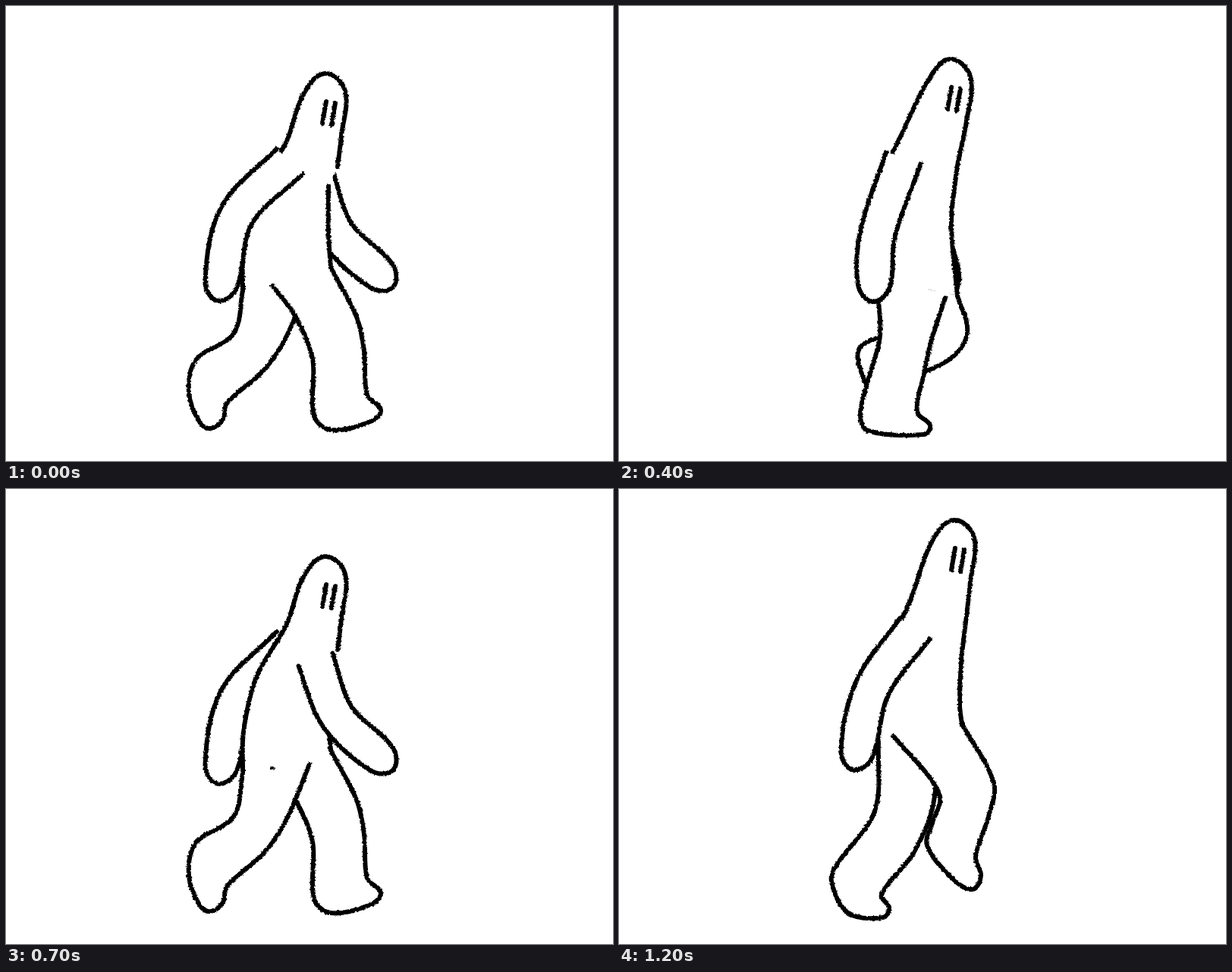
An HTML page for the animation above (1.3 s loop, 800 by 600 pixels).

```html
<!DOCTYPE html>
<html lang="en">
<head>
<meta charset="utf-8">
<title>Walk cycle</title>
<style>
  html, body { margin: 0; width: 100%; height: 100%; overflow: hidden; background: #fff; }
  svg { display: block; width: 800px; height: 600px; }
  path { fill: #fff; stroke: #000; stroke-width: 6; stroke-linecap: round; stroke-linejoin: round; }
  .line { fill: none; }
  .fill { stroke: none; }
</style>
</head>
<body>
<svg viewBox="0 0 800 600">
  <filter id="rough" filterUnits="userSpaceOnUse" x="0" y="0" width="800" height="600" color-interpolation-filters="sRGB">
    <feTurbulence id="grain" type="fractalNoise" baseFrequency=".35" numOctaves="2"/>
    <feDisplacementMap in="SourceGraphic" scale="3.5" xChannelSelector="R" yChannelSelector="G"/>
  </filter>
  <g id="figure" filter="url(#rough)"></g>
</svg>
<script>
// Half a stride. The other half is the same with the limbs swapped.
// body: back, shoulder, nape, crown, neck, chest, belly
// leg:  front hip, knee, shin, ankle, toe, ball, sole, heel, calf, hollow of the knee, back hip
// arm:  shoulder, elbow, hand
const pose = (at, body, legA, legB, armA, armB) => ({
  at,
  parts: [body, legA, legB, armA, armB].map(s => s.split(' ').map(p => p.split(',').map(Number)))
});
const half = [
  pose(0,
    '313,320 330,248 370,178 420,89 437,212 425,238 425,300',
    '428,345 462,410 472,455 476,513 494,533 478,549 428,559 406,540 404,465 380,407 351,369',
    '400,363 369,437 340,480 291,524 286,545 270,557 256,550 241,510 250,467 300,432 312,375',
    '374,205 304,276 283,368', '408,225 436,299 495,356'),
  pose(2,
    '315,345 338,278 368,207 418,120 434,244 431,282 428,330',
    '425,369 470,406 479,437 482,525 502,545 490,558 424,558 409,538 409,458 380,422 345,393',
    '400,388 368,447 334,498 279,522 262,551 250,556 237,543 229,500 230,472 300,441 321,395',
    '374,232 310,277 255,363', '416,262 455,322 516,350'),
  pose(3,
    '324,300 335,255 374,175 430,94 440,245 440,245 432,320',
    '424,362 442,418 449,465 451,534 470,547 466,562 400,563 382,545 383,480 360,424 326,346',
    '415,420 383,471 345,499 309,514 298,537 288,543 276,537 269,485 287,445 335,422 326,346',
    '380,212 323,284 295,358', '418,260 442,322 489,366'),
  pose(4,
    '321,305 345,228 373,168 436,70 446,210 446,210 438,285',
    '430,385 412,440 402,485 393,535 410,553 402,565 328,560 318,540 327,498 344,435 340,370',
    '446,382 459,430 437,465 375,497 367,520 354,529 341,522 320,485 318,450 376,416 331,357',
    '375,200 341,300 336,369', '405,198 407,285 428,363'),
  pose(5,
    '336,275 352,212 382,152 441,41 451,225 451,225 449,285',
    '421,362 412,425 387,482 346,535 356,552 348,565 302,559 280,517 288,494 337,425 342,335',
    '452,310 494,388 487,432 470,485 477,510 465,528 436,510 406,470 412,443 422,402 362,326',
    '411,196 426,300 439,346', '390,184 334,262 313,350')
];

const HALF = 7, STEP = 100;
const shift = ([x, y], [dx, dy], k = 1) => [x + dx * k, y + dy * k];
const unit = (a, b) => {
  const dx = b[0] - a[0], dy = b[1] - a[1], len = Math.hypot(dx, dy) || 1;
  return [dx / len, dy / len];
};
const mix = (a, b, k) => Array.isArray(a) ? a.map((v, i) => mix(v, b[i], k)) : a + (b - a) * k;
const swap = ([body, legA, legB, armA, armB]) => [body, legB, legA, armB, armA];

// Smooth path: tangents follow the neighbouring points, handles scale with segment length.
function curve(p) {
  const last = p.length - 1;
  const dirs = p.map((_, i) => unit(p[Math.max(i - 1, 0)], p[Math.min(i + 1, last)]));
  let d = 'M' + p[0];
  for (let i = 0; i < last; i++) {
    const a = p[i], b = p[i + 1], h = Math.hypot(b[0] - a[0], b[1] - a[1]) / 3;
    d += 'C' + [shift(a, dirs[i], h), shift(b, dirs[i + 1], -h), b];
  }
  return d;
}
const path = (points, kind = '') => `<path class="${kind}" d="${curve(points)}"/>`;

// A tapered tube around the joints, open at the shoulder and round at the hand.
function arm([shoulder, elbow, hand]) {
  const along = unit(elbow, hand);
  const side = k => [
    [shoulder, unit(shoulder, elbow), 24], [elbow, unit(shoulder, hand), 23], [hand, along, 21]
  ].map(([p, [x, y], w]) => shift(p, [-y, x], w * k));
  return path([...side(1), shift(hand, along, 21), ...side(-1).reverse()]);
}

function torso([back, shoulder, nape, crown, neck, chest, belly], legs) {
  const frontHip = legs.map(l => l[0]).sort((a, b) => b[0] - a[0])[0];
  const backHip = legs.map(l => l[l.length - 1]).sort((a, b) => a[0] - b[0])[0];
  const head = [[-29, 29], [0, 0], [27, 23], [22, 82]].map(o => shift(crown, o));
  const rear = [backHip, back, shoulder, nape, ...head, neck];
  const front = [chest, belly, frontHip];
  const eyes = [[2, 37], [14, 39]].map(o => {
    const top = shift(crown, o);
    return path([top, shift(top, [-5, 29])], 'line');
  });
  return path([...rear, ...front], 'fill') + path(rear, 'line') + path(front, 'line') + eyes.join('');
}

function figure(phase) {
  const u = phase % HALF;
  const keys = [...half, { at: HALF, parts: swap(half[0].parts) }];
  const i = keys.findIndex(k => k.at > u);
  const a = keys[i - 1], b = keys[i];
  const parts = mix(a.parts, b.parts, (u - a.at) / (b.at - a.at));
  const [body, nearLeg, farLeg, nearArm, farArm] = phase < HALF ? parts : swap(parts);
  return arm(farArm) + path(farLeg) + torso(body, [nearLeg, farLeg]) + path(nearLeg) + arm(nearArm);
}

// The second step hurries through its low point.
const cycle = [0, 1, 2, 3, 4, 5, 6, 7, 9, 10, 11, 11.5, 12].map(figure);
const stage = document.getElementById('figure'), grain = document.getElementById('grain');
let shown = -1;

function draw(time) {
  const i = Math.floor(time / STEP) % cycle.length;
  if (i !== shown) {
    shown = i;
    stage.innerHTML = cycle[i];
    grain.setAttribute('seed', i + 1);
  }
  requestAnimationFrame(draw);
}
draw(0);
</script>
</body>
</html>
```
